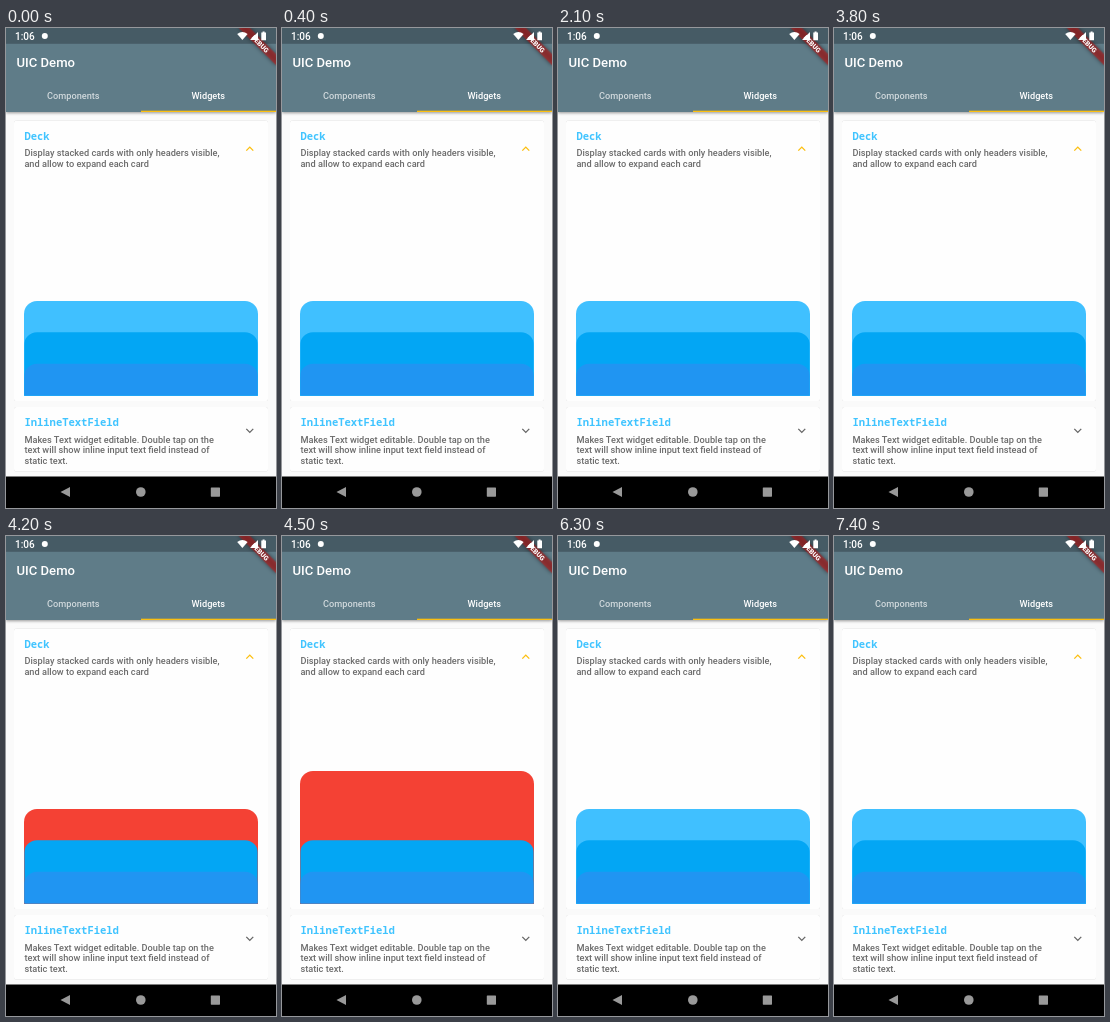
An HTML page for the animation above (8 s loop, 270 by 480 pixels).

```html
<!DOCTYPE html>
<html lang="en">
<head>
<meta charset="utf-8">
<title>UIC Demo</title>
<style>
  html, body { margin: 0; width: 100%; height: 100%; overflow: hidden; background: #fafafa; }
  svg { display: block; width: 270px; height: 480px; font: 500 9.2px Roboto, sans-serif; }
  .bar { fill: #5f7c88; filter: drop-shadow(0 1.4px 1.6px #0006); }
  .card { fill: #fefefe; filter: drop-shadow(0 .7px .5px #0003); }
  .white { fill: #fff; }
  .accent { fill: #fcbf10; }
  .name { font: 700 10.5px "Noto Sans Mono", "DejaVu Sans Mono", monospace; fill: #40c4ff; }
  .body { fill: #6c6c6c; }
  .mid { text-anchor: middle; }
  .nav { fill: #999; }
  .ribbon { fill: #b71c1c; fill-opacity: .63; filter: drop-shadow(0 0 2.2px #000b); }
  .top {
    fill: #40c0ff;
    animation: tint 8s step-end infinite, rise 8s step-end infinite;
  }
  @keyframes tint {
    0%, 78.75% { fill: #40c0ff; }
    52.5% { fill: #f44134; }
  }
  @keyframes rise {
    0%, 52.5%, 78.75% { transform: translateY(0); }
    53.75% { transform: translateY(-10px); }
    55% { transform: translateY(-26px); }
    56.25% { transform: translateY(-38px); }
    57.5% { transform: translateY(-42px); }
  }
</style>
</head>
<body>
<svg viewBox="0 0 270 480">
  <defs>
    <clipPath id="deck"><rect x="18.4" y="150" width="233.2" height="217.4"/></clipPath>
    <path id="chevron" d="M12 8l-6 6 1.41 1.41L12 10.83l4.59 4.58L18 14z"/>
  </defs>
  <rect width="270" height="480" fill="#fafafa"/>

  <!-- Deck section -->
  <rect class="card" x="8" y="92.5" width="254" height="280.5" rx="2.6"/>
  <text class="name" x="18.4" y="111.5">Deck</text>
  <text class="body">
    <tspan x="18.4" y="128">Display stacked cards with only headers visible,</tspan>
    <tspan x="18.4" y="138.5">and allow to expand each card</tspan>
  </text>
  <use class="accent" href="#chevron" transform="translate(235.9 113) scale(.657)"/>
  <g clip-path="url(#deck)">
    <rect class="top" x="18" y="273" width="234" height="160" rx="13"/>
    <rect x="18" y="304.3" width="234" height="100" rx="13" fill="#03a6f4"/>
    <rect x="18" y="335.7" width="234" height="100" rx="13" fill="#2095f2"/>
  </g>

  <!-- InlineTextField section -->
  <rect class="card" x="8" y="379" width="254" height="64.5" rx="2.6"/>
  <text class="name" x="18.4" y="398">InlineTextField</text>
  <text class="body">
    <tspan x="18.4" y="414.5">Makes Text widget editable. Double tap on the</tspan>
    <tspan x="18.4" y="425">text will show inline input text field instead of</tspan>
    <tspan x="18.4" y="435.5">static text.</tspan>
  </text>
  <use href="#chevron" transform="translate(235.9 410.5) scale(.657 -.657)" fill="#666"/>

  <!-- App bar and tabs -->
  <rect class="bar" width="270" height="84"/>
  <rect width="270" height="15.8" fill="#465b65"/>
  <text class="white" x="10.5" y="39" font-size="13.1">UIC Demo</text>
  <text class="white mid" x="67.3" y="71" fill-opacity=".7">Components</text>
  <text class="white mid" x="202.3" y="71">Widgets</text>
  <rect class="accent" x="135" y="82.7" width="135" height="1.3"/>

  <!-- Debug ribbon, under the status icons -->
  <rect class="ribbon" transform="translate(270 0) rotate(45)" x="-26.3" y="18.4" width="52.6" height="7.9"/>

  <!-- Status bar -->
  <g class="white">
    <text x="9" y="12" font-size="10">1:06</text>
    <circle cx="38.8" cy="8" r="3"/>
    <path d="M231.2 6Q236.4 2.2 241.6 6L236.4 12Z"/>
    <path d="M244 12H252V4Z"/>
    <path d="M255.3 4.5h1.3v-1h2v1H260V12.2h-4.7z"/>
  </g>
  <text class="white mid" transform="translate(270 0) rotate(45)" y="24.8" font-size="6.7" font-weight="900">DEBUG</text>

  <!-- Navigation bar -->
  <rect y="448.5" width="270" height="31.5"/>
  <g class="nav">
    <path d="M54.5 464L64 459V469Z"/>
    <circle cx="134.8" cy="464" r="4.8"/>
    <rect x="204.8" y="459.5" width="9.2" height="9.2" rx=".6"/>
  </g>
</svg>
</body>
</html>
```
